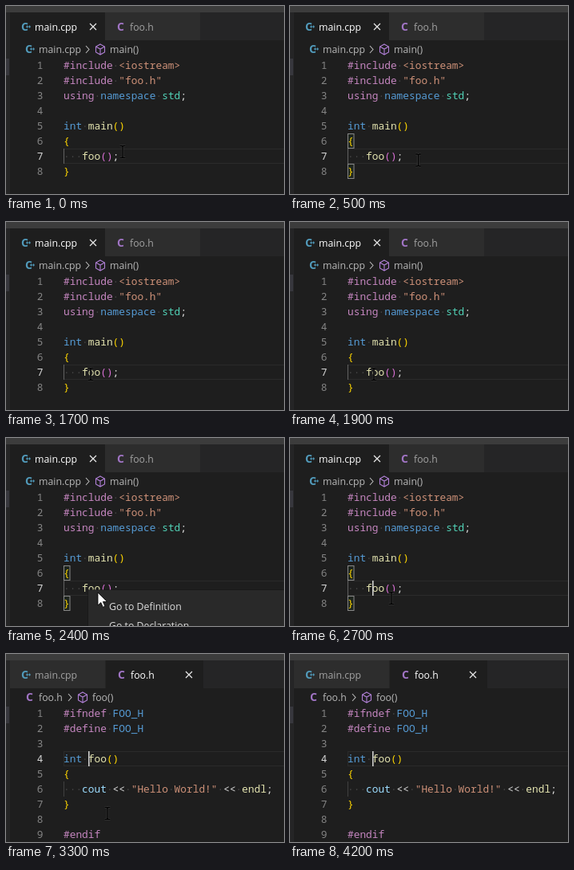
These frames come from a looping animation (348x236 px, 4.3 s). An HTML page:

```html
<!DOCTYPE html>
<html lang="en">
<head>
<meta charset="utf-8">
<title>Go to Definition</title>
<style>
  html, body { margin: 0; width: 100%; height: 100%; overflow: hidden; background: #1e1e1e; }
  svg { display: block; width: 100vw; height: 100vh; }
  text { white-space: pre; }
  .code { font: 500 12.83px "Noto Sans Mono", monospace; }
  .ui { font: 12.3px "Open Sans", sans-serif; }
  .icon { font: 700 14px "Open Sans", sans-serif; }
</style>
</head>
<body>
<svg id="stage" viewBox="0 0 348 236"></svg>
<script>
const LOOP = 4300, STEP = 100;
const LEFT = 72, TOP = 65, ROW = 19, CHAR = 7.7;
const C = {
  pink: '#c586c0', str: '#ce9178', blue: '#569cd6', type: '#52d3b8', fn: '#e4e4b0',
  text: '#e0e0e0', gold: '#ffd700', orchid: '#da70d6', name: '#9cdcfe', dot: '#474747',
  cpp: '#519aba', head: '#a074c4', crumb: '#b8b8b8'
};

// Each line is a list of [colour, text] pairs.
const MAIN = [
  [['pink', '#include'], ['str', ' <iostream>']],
  [['pink', '#include'], ['str', ' "foo.h"']],
  [['pink', 'using'], ['blue', ' namespace'], ['type', ' std'], ['text', ';']],
  [],
  [['blue', 'int'], ['fn', ' main'], ['gold', '()']],
  [['gold', '{']],
  [['fn', '   foo'], ['orchid', '()'], ['text', ';']],
  [['gold', '}']]
];
const HEADER = [
  [['pink', '#ifndef'], ['blue', ' FOO_H']],
  [['pink', '#define'], ['blue', ' FOO_H']],
  [],
  [['blue', 'int'], ['fn', ' foo'], ['gold', '()']],
  [['gold', '{']],
  [['name', '   cout'], ['text', ' <<'], ['str', ' "Hello World!"'], ['text', ' <<'], ['fn', ' endl'], ['text', ';']],
  [['gold', '}']],
  [],
  [['pink', '#endif']]
];

const stage = document.getElementById('stage');

function add(parent, tag, attrs, content) {
  const el = document.createElementNS('http://www.w3.org/2000/svg', tag);
  for (const k in attrs) el.setAttribute(k, attrs[k]);
  if (content) el.textContent = content;
  return parent.appendChild(el);
}
const group = (parent = stage) => add(parent, 'g', {});
const rect = (p, x, y, width, height, fill, more) => add(p, 'rect', { x, y, width, height, fill, ...more });
const label = (p, x, y, fill, s, cls = 'ui') => add(p, 'text', { x, y, fill, class: cls }, s);
const path = (p, d, stroke, width = 1) =>
  add(p, 'path', { d, stroke, 'stroke-width': width, fill: 'none' });
const rowY = n => TOP + (n - 1) * ROW;
const show = (el, on) => el.setAttribute('visibility', on ? 'inherit' : 'hidden');

function cppIcon(p, x, y) {
  label(p, x - 6, y + 5, C.cpp, 'C', 'icon');
  path(p, `M${x} ${y}h3m-1.5 -1.5v3M${x + 3} ${y}h3m-1.5 -1.5v3`, C.cpp, 1.1);
}
const headIcon = (p, x, y) => label(p, x - 5, y + 5, C.head, 'C', 'icon');

function cube(p, x, y) {
  path(p, `M${x} ${y - 6.5}l5.5 3v7l-5.5 3l-5.5 -3v-7zM${x - 5.5} ${y - 3.5}l5.5 3l5.5 -3M${x} ${y - .5}v7`, '#b180d7', 1.1);
}

function tab(p, x, width, name, icon, active) {
  rect(p, x, 8, width, 35, active ? '#1e1e1e' : '#2d2d2d');
  icon(p, x + 20, 26);
  label(p, x + 31, 31, active ? '#fff' : '#a2a2a2', name);
  if (active) path(p, `M${x + 100} 22l8 8m0 -8l-8 8`, '#e8e8e8', 1.2);
}

function crumbs(p, icon, file, x, fn) {
  icon(p, 30, 54);
  label(p, 41, 59, C.crumb, file);
  path(p, `M${x - 2} 50l4 4.5l-4 4.5`, '#bbb', 1.1);
  cube(p, x + 16, 54.5);
  label(p, x + 28, 59, C.crumb, fn);
}

function codeLines(p, lines, current) {
  lines.forEach((tokens, i) => {
    const y = rowY(i + 1) + 14;
    label(p, 38.8, y, i + 1 === current ? '#d6d6d6' : '#858585', i + 1, 'code');
    let col = 0;
    for (const [color, s] of tokens) {
      for (const part of s.match(/ +|[^ ]+/g)) {
        const blank = part[0] === ' ';
        label(p, LEFT + col * CHAR, y, blank ? C.dot : C[color],
          blank ? '·'.repeat(part.length) : part, 'code');
        col += part.length;
      }
    }
  });
}

const guide = (p, row, color) => rect(p, LEFT, rowY(row), 1, ROW, color);
const caret = (p, row) => rect(p, 103, rowY(row), 1.6, ROW, '#d0d0ce');
const currentLine = (p, row) =>
  rect(p, LEFT + .5, rowY(row) + .5, 290, ROW - 1, 'none', { stroke: '#2b2b2b' });

// Window frame
rect(stage, 0, 0, 348, 236, '#1e1e1e');
rect(stage, 0, 0, 348, 8, '#3c3c3c');
rect(stage, 0, 8, 348, 35, '#252526');

// First file
const mainView = group();
tab(mainView, 5, 119, 'main.cpp', cppIcon, true);
tab(mainView, 124, 119, 'foo.h', headIcon, false);
crumbs(mainView, cppIcon, 'main.cpp', 102, 'main()');
currentLine(mainView, 7);
guide(mainView, 7, '#626262');
const braces = group(mainView);
for (const row of [6, 8])
  rect(braces, 72.5, rowY(row) + .5, 7.5, ROW - 1, '#1e251e', { stroke: '#888' });
codeLines(mainView, MAIN, 7);
const mainCaret = caret(mainView, 7);

// Second file
const headView = group();
tab(headView, 5, 119, 'main.cpp', cppIcon, false);
tab(headView, 125, 122, 'foo.h', headIcon, true);
crumbs(headView, headIcon, 'foo.h', 80, 'foo()');
currentLine(headView, 4);
guide(headView, 6, '#404040');
codeLines(headView, HEADER, 4);
const headCaret = caret(headView, 4);

// Sidebar edge
rect(stage, 0, 8, 5, 228, '#252526');
rect(stage, 0, 66, 4, 21, '#37373d');

// Context menu
const menu = group();
rect(menu, 102, 190, 250, 50, '#161616', { opacity: .6 });
rect(menu, 103, 191, 250, 50, '#292929');
const hover = rect(menu, 103, 199, 250, 25, '#094771');
label(menu, 129, 216, '#dcdcdc', 'Go to Definition');
label(menu, 129, 240, '#dcdcdc', 'Go to Declaration');

// Pointers
const beam = group();
const beamShape = 'M-3.5 -7.5h2.5l1 1l1 -1h2.5M0 -6.5v13M-3.5 7.5h2.5l1 -1l1 1h2.5';
path(beam, beamShape, '#454545', 2.4);
path(beam, beamShape, '#000', 1.4);
const arrow = add(stage, 'path', {
  d: 'M0 0v16l3.8 -3.5l2.5 5.8l2.6 -1.1l-2.5 -5.7h5.2z',
  fill: '#fff', stroke: '#000', 'stroke-width': .8
});

// Pointer route: [time, x, y]
const ROUTE = [
  [0, 146, 183], [200, 148, 185], [600, 163, 195], [800, 164, 194], [1000, 161, 191],
  [1200, 119, 195], [1500, 107, 191], [1700, 106, 191], [2100, 104, 191],
  [2400, 115, 194], [2600, 127, 201], [2900, 127, 201], [3300, 127, 200], [3700, 127, 222]
];

function pointerAt(t) {
  const i = ROUTE.findIndex(k => k[0] > t);
  if (i < 0) return ROUTE[ROUTE.length - 1].slice(1);
  const [t0, x0, y0] = ROUTE[i - 1], [t1, x1, y1] = ROUTE[i];
  const u = (t - t0) / (t1 - t0), e = u * u * (3 - 2 * u);
  return [x0 + (x1 - x0) * e, y0 + (y1 - y0) * e];
}

function draw(ms) {
  const t = Math.floor(ms % LOOP / STEP) * STEP;
  const within = (a, b) => t >= a && t < b;
  const menuOpen = within(2100, 2700);
  const [x, y] = pointerAt(t);

  show(mainView, t < 3000);
  show(headView, t >= 3000);
  show(braces, within(300, 1400) || within(2100, 3000));
  show(mainCaret, within(2700, 3000));
  show(headCaret, t >= 3000 && (t - 3000) % 1060 < 530);
  show(menu, menuOpen);
  show(hover, within(2500, 2700));
  show(beam, !menuOpen && t < 3900);
  show(arrow, menuOpen);
  for (const el of [beam, arrow]) el.setAttribute('transform', `translate(${x} ${y})`);
}

const start = performance.now();
function tick() {
  draw(performance.now() - start);
  requestAnimationFrame(tick);
}
tick();
</script>
</body>
</html>
```
